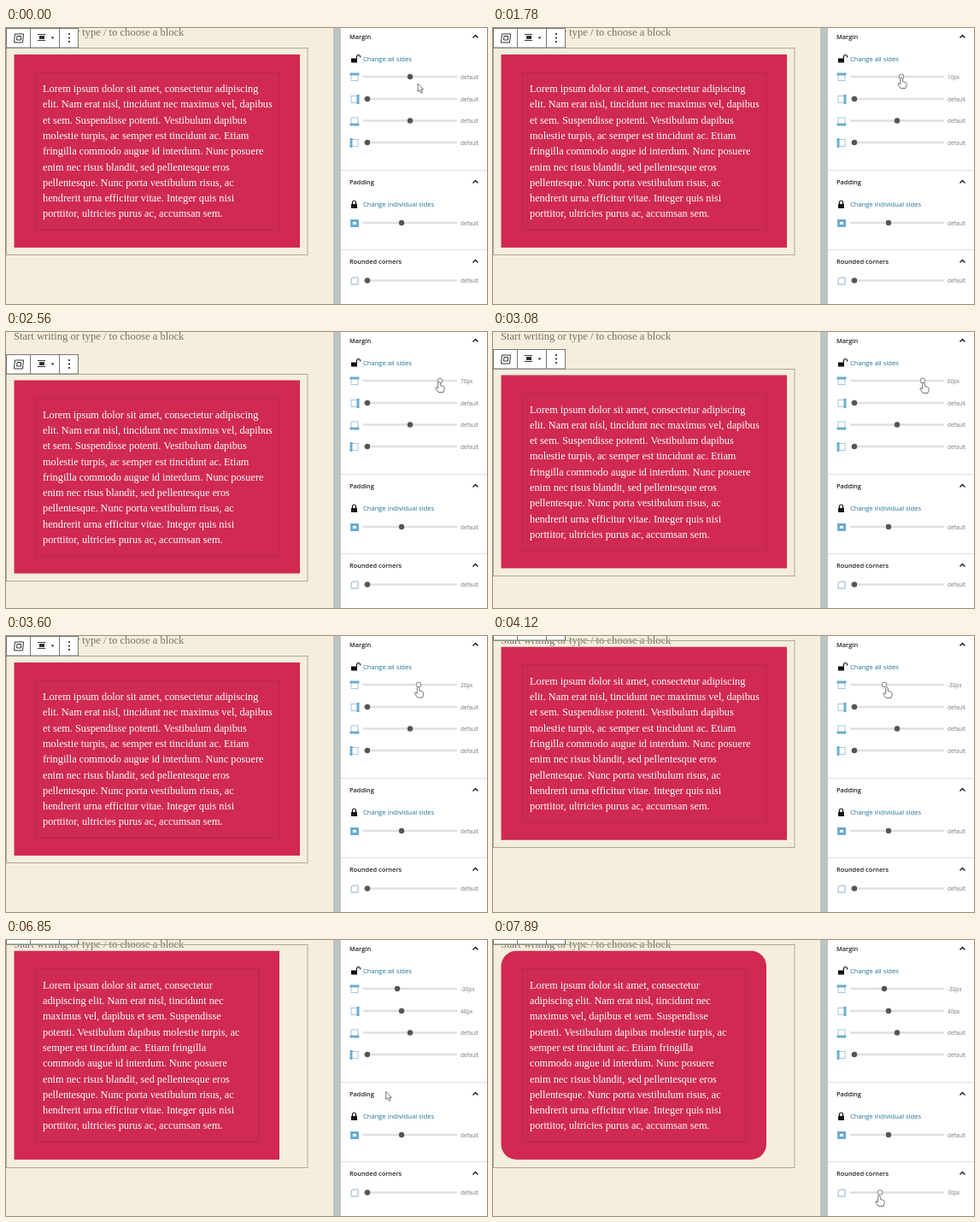
Recreate the animation shown at these times as an HTML page with a canvas. Size 563 by 323 pixels, loop 8 s.

```html
<!DOCTYPE html>
<html lang="en">
<head>
<meta charset="utf-8">
<title>Block spacing controls</title>
<style>
html, body { margin: 0; width: 100%; height: 100%; overflow: hidden; background: #fff; }
canvas { display: block; width: 563px; height: 323px; }
</style>
</head>
<body>
<canvas id="stage"></canvas>
<script>
const canvas = document.getElementById('stage');
const ctx = canvas.getContext('2d');
const dpr = window.devicePixelRatio || 1;
canvas.width = 563 * dpr;
canvas.height = 323 * dpr;

const LOOP = 8000, STEP = 130, START = 1000;
const SERIF = '"Liberation Serif", serif';
const SANS = '"Open Sans", sans-serif';
const CREAM = '#f6eedd', RED = '#d02952', BLUE = '#69adcf', INK = '#555';

// Paragraph line breaks for each available width.
const WRAPS = [
  'Lorem ipsum dolor sit amet, consectetur adipiscing|elit. Nam erat nisl, tincidunt nec maximus vel, dapibus|et sem. Suspendisse potenti. Vestibulum dapibus|molestie turpis, ac semper est tincidunt ac. Etiam|fringilla commodo augue id interdum. Nunc posuere|enim nec risus blandit, sed pellentesque eros|pellentesque. Nunc porta vestibulum risus, ac|hendrerit urna efficitur vitae. Integer quis nisi|porttitor, ultricies purus ac, accumsan sem.',
  'Lorem ipsum dolor sit amet, consectetur adipiscing|elit. Nam erat nisl, tincidunt nec maximus vel,|dapibus et sem. Suspendisse potenti. Vestibulum|dapibus molestie turpis, ac semper est tincidunt ac.|Etiam fringilla commodo augue id interdum. Nunc|posuere enim nec risus blandit, sed pellentesque|eros pellentesque. Nunc porta vestibulum risus, ac|hendrerit urna efficitur vitae. Integer quis nisi|porttitor, ultricies purus ac, accumsan sem.',
  'Lorem ipsum dolor sit amet, consectetur|adipiscing elit. Nam erat nisl, tincidunt nec|maximus vel, dapibus et sem. Suspendisse potenti.|Vestibulum dapibus molestie turpis, ac semper est|tincidunt ac. Etiam fringilla commodo augue id|interdum. Nunc posuere enim nec risus blandit,|sed pellentesque eros pellentesque. Nunc porta|vestibulum risus, ac hendrerit urna efficitur vitae.|Integer quis nisi porttitor, ultricies purus ac,|accumsan sem.',
  'Lorem ipsum dolor sit amet, consectetur|adipiscing elit. Nam erat nisl, tincidunt nec|maximus vel, dapibus et sem. Suspendisse|potenti. Vestibulum dapibus molestie turpis, ac|semper est tincidunt ac. Etiam fringilla|commodo augue id interdum. Nunc posuere|enim nec risus blandit, sed pellentesque eros|pellentesque. Nunc porta vestibulum risus, ac|hendrerit urna efficitur vitae. Integer quis nisi|porttitor, ultricies purus ac, accumsan sem.'
].map(text => text.split('|'));

// Keyframes: [time, values...]
const CURSOR = [[1000, 482, 65], [1260, 478, 58], [1780, 478, 58], [2560, 507, 58], [3080, 504, 59],
  [4120, 461, 60], [4380, 461, 60], [5290, 423, 86], [5420, 427, 86], [5810, 449, 86], [6200, 461, 86],
  [6460, 461, 86], [7370, 423, 299], [7890, 452, 299]];
const TOP = [[1650, 0], [1780, 10], [2560, 70], [2690, 70], [2820, 60], [3080, 60], [4120, -30]];
const RIGHT = [[5290, 0], [5420, 6], [5810, 30], [6200, 40]];
const RADIUS = [[7370, 0], [7890, 30]];

function sample(keys, t) {
  const next = keys.findIndex(k => k[0] > t);
  if (next === 0) return keys[0].slice(1);
  if (next < 0) return keys[keys.length - 1].slice(1);
  const a = keys[next - 1], b = keys[next];
  const p = (t - a[0]) / (b[0] - a[0]);
  return a.slice(1).map((v, i) => v + (b[i + 1] - v) * p);
}
const tens = v => Math.round(v / 10) * 10;

function rect(x, y, w, h, fill) {
  ctx.fillStyle = fill;
  ctx.fillRect(x, y, w, h);
}
function frame(x, y, w, h, color, width = 1) {
  ctx.strokeStyle = color;
  ctx.lineWidth = width;
  ctx.strokeRect(x, y, w, h);
}
function text(str, x, y, font, color) {
  ctx.font = font;
  ctx.fillStyle = color;
  ctx.fillText(str, x, y);
}
function path(d, fill, stroke, width = 1, x = 0, y = 0) {
  const shape = new Path2D(d);
  ctx.save();
  ctx.translate(x, y);
  if (fill) { ctx.fillStyle = fill; ctx.fill(shape); }
  if (stroke) { ctx.strokeStyle = stroke; ctx.lineWidth = width; ctx.stroke(shape); }
  ctx.restore();
}
function disc(x, y, r, fill) {
  ctx.beginPath();
  ctx.arc(x, y, r, 0, 7);
  ctx.fillStyle = fill;
  ctx.fill();
}

function drawToolbar(y) {
  rect(0, y, 84, 23, '#fff');
  frame(0.5, y + 0.5, 84, 22.5, '#77756f');
  rect(28, y, 1, 23, '#77756f');
  rect(62, y, 1, 23, '#77756f');
  path('M-4.5-4.5H5.5L4.5 5.5H-5.5ZM-2-2H2.5V2.5H-2.5Z', null, '#333', 1, 15, y + 11.5);
  rect(37, y + 7, 9, 1, '#333');
  rect(39, y + 9, 6, 4, '#333');
  rect(37, y + 14, 9, 1, '#333');
  path('M-2-1H2L0 1.5Z', '#333', null, 1, 54.5, y + 11.5);
  for (const dy of [-4.5, 0, 4.5]) disc(74, y + 11.5 + dy, 1.1, '#222');
}

function drawEditor(top, right, radius) {
  rect(0, 0, 383, 323, CREAM);
  text('Start writing or type / to choose a block', 9, 9, '12.6px ' + SERIF, '#77736b');

  // Positive margins only count beyond the 28px they collapse into.
  const y = 31 + 0.61 * (top > 0 ? Math.max(0, top - 28) : top);
  const edge = 344 - 0.6 * right;
  const lines = WRAPS[right >= 40 ? 3 : right >= 30 ? 2 : right > 0 ? 1 : 0];
  const height = 61.5 + lines.length * 18.27;

  ctx.beginPath();
  ctx.roundRect(9.5, y, edge - 9.5, height, radius * 0.6);
  ctx.fillStyle = RED;
  ctx.fill();
  frame(34.5, y + 21.5, edge - 58.5, height - 42, 'rgba(120,25,60,.22)');
  lines.forEach((line, i) => text(line, 43, y + 44 + i * 18.3, '12.3px ' + SERIF, '#fff'));

  const boxTop = Math.round(y - 8);
  frame(0.5, boxTop + 0.5, 352.5, Math.round(height + 16.5), '#aaa79d');
  drawToolbar(boxTop - 23);
  rect(383, 0, 9, 323, '#bcc4c0');
}

function sideIcon(y, side) {
  frame(404, y - 4, 8, 8, '#9fc9de');
  if (side === 'top') rect(402.5, y - 5, 11, 3, BLUE);
  if (side === 'right') rect(410.5, y - 5.5, 3, 11, BLUE);
  if (side === 'bottom') rect(402.5, y + 2.5, 11, 3, BLUE);
  if (side === 'left') rect(402.5, y - 5.5, 3, 11, BLUE);
  if (side === 'all') frame(404.5, y - 3, 7, 6, BLUE, 3);
  if (side === 'corner') {
    rect(403, y - 5, 10, 10, '#fff');
    path('M-4 4V-1Q-4-4-1-4H4V4Z', null, '#8fb3c4', 1, 408, y);
  }
}

function slider(y, side, thumb, value, hot) {
  sideIcon(y + 0.5, side);
  rect(418, y - 1.2, 110, 2.4, '#dcdfe1');
  disc(thumb, y, 3.2, hot ? '#8a8a8a' : INK);
  if (hot) disc(thumb, y, 2.3, '#fff');
  text(value ? value + 'px' : 'default', 532, y + 2.7, '6.4px ' + SANS, '#777');
}

function heading(label, y) {
  text(label, 402, y + 2.7, '600 7.4px ' + SANS, '#222');
  path('M-3 1.6L0-1.5L3 1.6', null, '#222', 1.4, 549.5, y);
}

function lock(y, open) {
  rect(404, y - 1, 7, 5, '#111');
  path(open ? 'M3-1V-3A2 2 0 0 1 7-3V-2' : 'M-2-1V-3A2 2 0 0 1 2-3V-1', null, '#111', 1.2, 407.5, y);
}

function drawPanel(top, right, radius, hot) {
  rect(392, 0, 171, 323, '#fff');
  rect(392, 166, 171, 1, '#e0e0e0');
  rect(392, 259, 171, 1, '#e0e0e0');
  heading('Margin', 10);
  heading('Padding', 180);
  heading('Rounded corners', 273);
  lock(36.5, true);
  lock(207, false);
  text('Change all sides', 418, 39, '7.6px ' + SANS, '#1b7299');
  text('Change individual sides', 418, 209, '7.6px ' + SANS, '#1b7299');
  slider(57, 'top', 473 + top * 0.5, top, hot === 'top');
  slider(83, 'right', 423 + right, right, hot === 'right');
  slider(108.5, 'bottom', 473, 0);
  slider(134, 'left', 423, 0);
  slider(228, 'all', 463, 0);
  slider(295.5, 'corner', 423 + radius, radius, hot === 'radius');
}

function drawCursor(x, y, hand) {
  const shape = hand
    ? 'M-1.3 1Q0-1 1.3 1V4.5L4.8 5.4Q6.6 6 6.2 8.5L5 12.5H-.8L-4 8.2Q-4.4 6.2-2.8 6.8L-1.3 8Z'
    : 'M0 0V9.5L2.2 7.6L3.8 11L5.4 10.2L3.8 7H6.6Z';
  path(shape, '#fff', '#666', 0.9, x, y);
}

function draw(now) {
  const time = now % LOOP;
  const t = time < START ? 0 : START + STEP * Math.floor((time - START) / STEP);
  const top = tens(sample(TOP, t)[0]);
  const right = tens(sample(RIGHT, t)[0]);
  const radius = Math.round(sample(RADIUS, t)[0]);
  const [x, y] = sample(CURSOR, t);
  const hot = t >= 1260 && t < 4510 ? 'top'
    : t >= 5290 && t < 6590 ? 'right'
    : t >= 7370 ? 'radius' : '';

  ctx.setTransform(dpr, 0, 0, dpr, 0, 0);
  drawEditor(top, right, radius);
  drawPanel(top, right, radius, hot);
  drawCursor(x, y, hot);
  requestAnimationFrame(() => draw(performance.now()));
}
draw(0);
</script>
</body>
</html>
```
